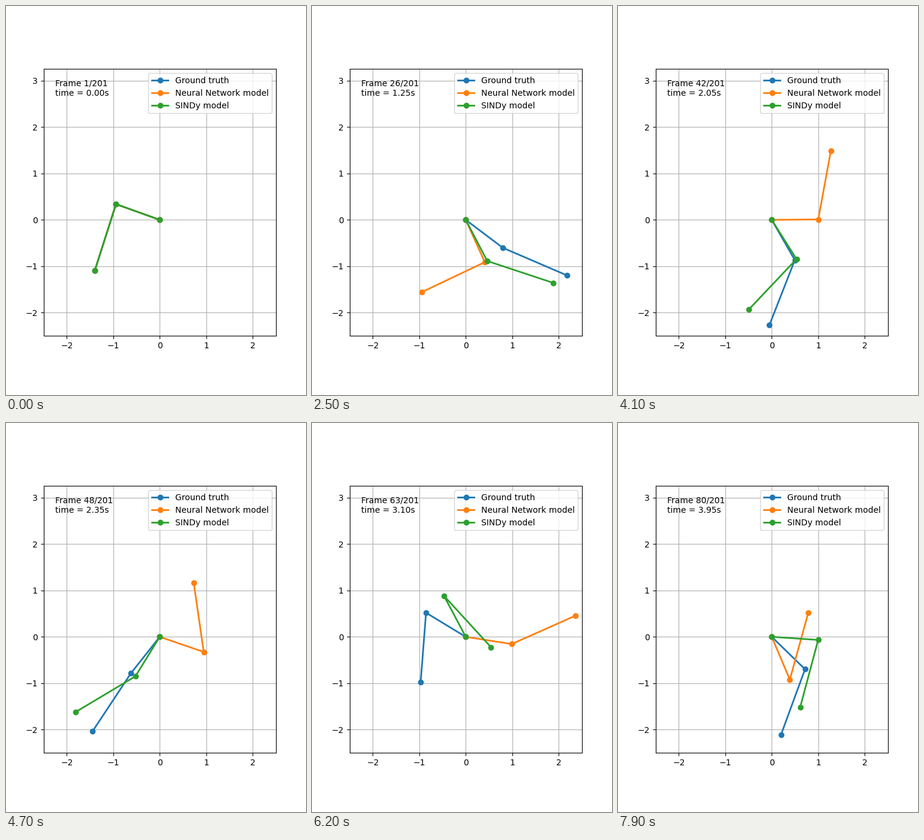
A matplotlib script that plays this animation: 500 by 650 pixels, repeating every 8 s.

```python
import numpy as np
import matplotlib.pyplot as plt
from matplotlib.animation import FuncAnimation

FRAMES, TOTAL, DT = 80, 201, 0.05
H = DT / 2                      # integration step
N = 2 * FRAMES - 1              # samples per path
L1, L2, G = 1.0, 1.5, 9.81
FIRM, SOFT = 5000, 25           # weights of exact and rough key points

# Key points: both angles from straight down, in degrees
TIMES = (0, 0.45, 0.75, 1.25, 1.7, 2.05, 2.35, 2.7, 3.1, 3.95)
ROUGH = (0.45, 2.05, 2.7)
DROP = [(-109.8, -17.65), (-8, -26)]
TRUTH = DROP + [(49.3, -10), (52.9, 66.7), (42.4, 45.7), (22, -24),
                (-38.3, -33.4), (-103, -25), (-121.3, -4.4), (45.7, -20.1)]
NEURAL = DROP + [(48.1, -13.4), (24.2, -64.5), (42.8, 133), (72, 153),
                 (71, 188.2), (78, 175), (81.1, 114), (22.9, -195.4)]
SINDY = DROP + [(50.5, -10.4), (27.5, 71.6), (24.3, 34), (22, -22),
                (-31.6, -59.1), (-107, -20), (-152.1, 42.4), (-273.8, -14.9)]


def accel(q, w, mu):
    """Angular accelerations; mu is the lower share of the total mass."""
    a, b = q
    s, c = np.sin(a - b), np.cos(a - b)
    pull = L1 * w[0] ** 2 * s - G * np.sin(b)
    acc_a = -(mu * L2 * w[1] ** 2 * s + G * np.sin(a) + mu * c * pull)
    acc_a = acc_a / (L1 * (1 - mu * c * c))
    return np.array([acc_a, (pull - L1 * acc_a * c) / L2])


def residual(q, mu, s):
    """How far a sampled path is from free motion with forces scaled by s."""
    w = (q[2:] - q[:-2]) / (2 * H)
    bend = (q[2:] - 2 * q[1:-1] + q[:-2]) / H ** 2
    return (bend - s * accel(q[1:-1].T, w.T, mu).T).ravel()


def jacobian(q, mu, s, r, eps=1e-6):
    jac = np.zeros((r.size, q.size))
    k = np.arange(1, N - 1)
    for c in range(3):
        col = k + (c - k + 1) % 3 - 1
        for j in range(2):
            p = q.copy()
            p[c::3, j] += eps
            diff = ((residual(p, mu, s) - r) / eps).reshape(-1, 2)
            for e in range(2):
                jac[2 * (k - 1) + e, 2 * col + j] = diff[:, e]
    return jac


def swing(points, mu):
    """Most natural pendulum path through the key points, with its cost."""
    at = np.rint(np.array(TIMES) / H).astype(int)
    cols = np.concatenate([2 * at, 2 * at + 1])
    goal = np.radians(points).T.ravel()
    pull = np.array([SOFT if t in ROUGH else FIRM for t in TIMES] * 2) ** 2.0

    def total(path, s):
        miss = path.ravel()[cols] - goal
        return (residual(path, mu, s) ** 2).sum() + (pull * miss ** 2).sum()

    q = np.zeros((N, 2))
    for s in np.linspace(0, 1, 6):      # spline first, then add the forces
        lam, best, moved = 1e-7, total(q, s), True
        for _ in range(35 if s == 1 else 8):
            if moved:
                r = residual(q, mu, s)
                jac = jacobian(q, mu, s, r)
                hess, grad = jac.T @ jac, jac.T @ r
                hess[cols, cols] += pull
                grad[cols] += pull * (q.ravel()[cols] - goal)
            damp = hess + lam * np.diag(np.diag(hess))
            new = q - np.linalg.solve(damp, grad).reshape(N, 2)
            cost = total(new, s)
            moved = cost < best
            if moved:
                gain = 1 - cost / best
                q, best, lam = new, cost, lam * 0.3
                if gain < 1e-5:
                    break
            else:
                lam *= 10
    return best, q


# The mass share is the one that lets the true pendulum move most freely
share = min((0.35, 0.5, 0.65, 0.8), key=lambda mu: swing(TRUTH, mu)[0])
paths = [swing(points, share)[1][::2] for points in (TRUTH, NEURAL, SINDY)]

fig = plt.figure(figsize=(5, 6.5), dpi=100)
ax = fig.add_subplot(autoscale_on=False, xlim=(-2.5, 2.5), ylim=(-2.5, 3.25))
ax.set_aspect("equal")
ax.grid()
names = ("Ground truth", "Neural Network model", "SINDy model")
lines = [ax.plot([], [], "o-", lw=2, label=name)[0] for name in names]
ax.legend(loc="upper right")
label = ax.text(0.05, 0.9, "", transform=ax.transAxes)


def draw(i):
    for line, path in zip(lines, paths):
        a, b = path[i]
        x, y = L1 * np.sin(a), -L1 * np.cos(a)
        line.set_data([0, x, x + L2 * np.sin(b)], [0, y, y - L2 * np.cos(b)])
    label.set_text(f"Frame {i + 1}/{TOTAL}\ntime = {i * DT:.2f}s")
    return [*lines, label]


anim = FuncAnimation(fig, draw, frames=FRAMES, interval=100, repeat=True)
plt.show()
```
